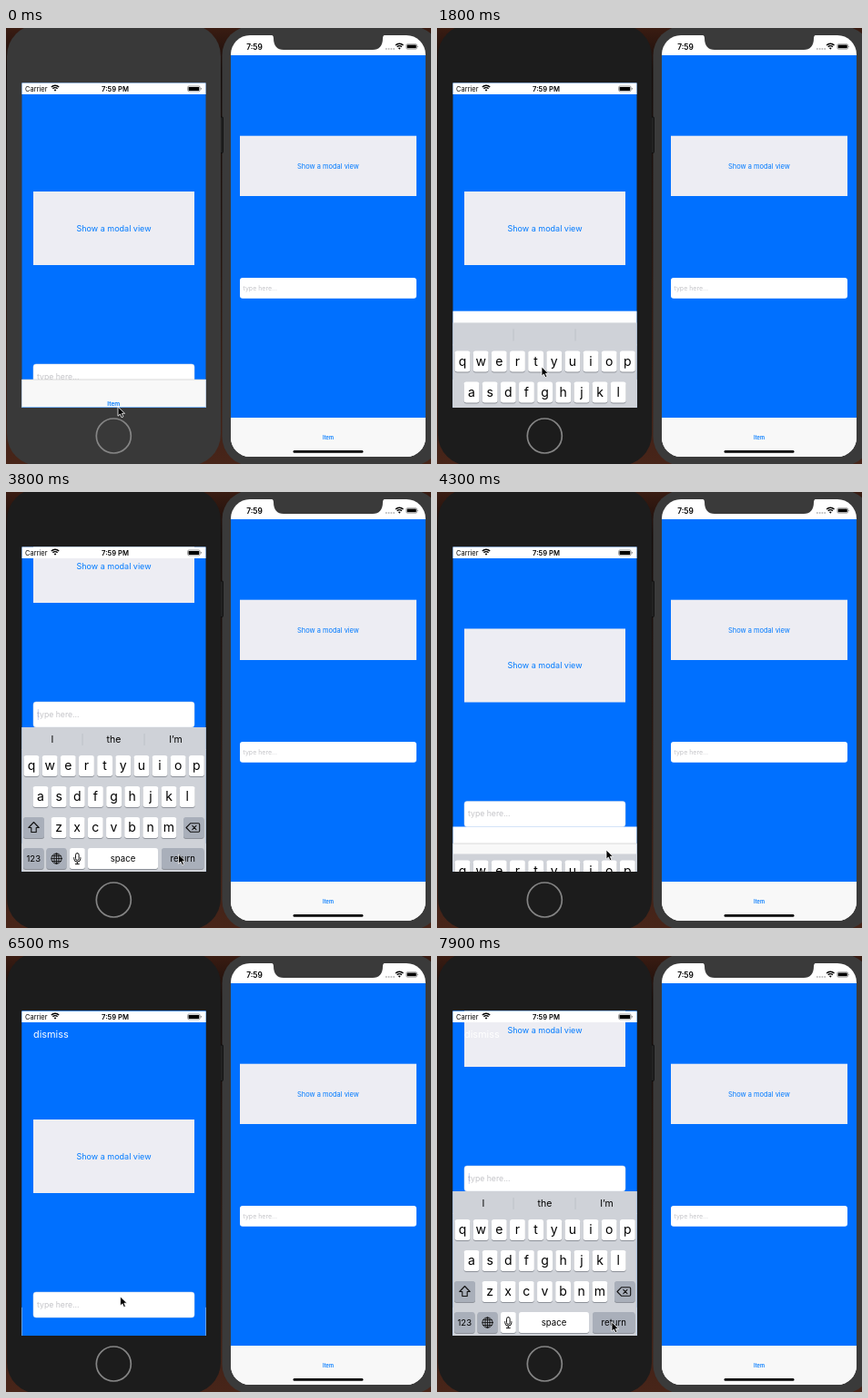
An HTML page for the animation above (8 s loop, 467 by 480 pixels).

```html
<!DOCTYPE html>
<html lang="en">
<head>
<meta charset="utf-8">
<title>Two phones with a keyboard and a modal view</title>
<style>
  html, body { margin: 0; width: 100%; height: 100%; overflow: hidden; background: #1a0f0c; }
  svg { display: block; width: 100vw; height: 100vh; }
  text { font-family: Inter, Roboto, Arial, sans-serif; }
  .mid { text-anchor: middle; }
  .link { fill: #007aff; }
  .hint { fill: #c4c4c8; }
  .sea { fill: #0070ff; }
  .box { fill: #ededf3; }
  .bar { fill: #f8f8f8; }
  .line { fill: none; stroke: #111; stroke-linecap: round; stroke-linejoin: round; }
</style>
</head>
<body>
<svg viewBox="0 0 467 480" preserveAspectRatio="none">
  <defs>
    <linearGradient id="desk" x2="0" y2="1">
      <stop offset="0" stop-color="#3a1c12"/>
      <stop offset=".1" stop-color="#140c0a"/>
      <stop offset=".5" stop-color="#241510"/>
      <stop offset="1" stop-color="#482519"/>
    </linearGradient>
    <clipPath id="screen"><rect x="17.5" y="60.5" width="202" height="357.5"/></clipPath>
    <g id="wifi">
      <path d="M-4.2-4a6 6 0 0 1 8.4 0M-2.6-2.2a3.7 3.7 0 0 1 5.2 0" fill="none" stroke="#000" stroke-width="1.4"/>
      <path d="M-1.4-.9Q0-2 1.4-.9L0 .7z"/>
    </g>
    <g id="battery">
      <rect x=".4" y=".4" width="13.6" height="5.8" rx="1.4" fill="none" stroke="#777" stroke-width=".7"/>
      <rect x="1.3" y="1.3" width="11.8" height="4" rx=".6"/>
      <path d="M14.8 2.2q1.2 1.1 0 2.2z"/>
    </g>
    <g id="form">
      <rect class="box" x="30" y="180" width="177" height="81"/>
      <text class="link mid" x="118.5" y="223.5" font-size="9">Show a modal view</text>
      <rect x="30" y="370" width="177" height="28" rx="3" fill="#fff" stroke="#cfd6e4" stroke-width=".5"/>
      <text class="hint" x="34" y="387" font-size="8.7">type here...</text>
    </g>
  </defs>

  <rect width="467" height="480" fill="url(#desk)"/>

  <!-- right phone -->
  <rect x="237.5" y="-2" width="240" height="484" rx="32" fill="#3a3a3a"/>
  <rect x="247" y="8" width="214" height="464" rx="21" fill="#fff"/>
  <rect class="sea" x="247" y="30" width="214" height="399"/>
  <path class="bar" d="M247 429H461V451a21 21 0 0 1-21 21H268a21 21 0 0 1-21-21z"/>
  <path d="M290 7.5H418c-3 0-4 1.500-4 4c0 8-4 12.500-11 12.500H305c-7 0-11-4.500-11-12.500c0-2.500-1-4-4-4z" fill="#3a3a3a"/>
  <text class="mid" x="273" y="23.500" font-size="8.400" font-weight="600">7:59</text>
  <path d="M417 23h10" stroke="#aaa" stroke-width="1.400" stroke-dasharray="1.600 1.200"/>
  <use href="#wifi" transform="translate(432.300 23)"/>
  <use href="#battery" transform="translate(439.500 17.300) scale(.86 .95)"/>
  <rect class="box" x="257" y="118.700" width="194" height="66.300"/>
  <text class="link mid" x="354" y="154.800" font-size="7.450">Show a modal view</text>
  <rect x="257" y="275" width="194" height="22.700" rx="3" fill="#fff"/>
  <text class="hint" x="260.500" y="289" font-size="7">type here...</text>
  <text class="link mid" x="354" y="452.700" font-size="5.600" font-weight="600">Item</text>
  <rect x="315.500" y="465" width="77" height="2.800" rx="1.400"/>

  <!-- left phone -->
  <rect x="234" y="98" width="4.500" height="39.500" rx="1" fill="#222" stroke="#0c0c0c" stroke-width=".8"/>
  <rect id="body" x="1" y="-4" width="235" height="486" rx="35"/>
  <circle cx="118.300" cy="449" r="19" fill="none" stroke="#858585" stroke-width="1.700"/>

  <g clip-path="url(#screen)">
    <g id="main">
      <rect class="sea" x="17" y="60" width="203" height="358"/>
      <g class="scroll"><use href="#form"/><rect class="caret" x="34.800" y="378" width="1.100" height="12" fill="#4667d8"/></g>
      <rect x="17" y="60" width="203" height="13" fill="#fff"/>
      <rect class="below" x="17" width="203" height="400" fill="#fff"/>
      <rect class="bar" x="17" y="387" width="203" height="31"/>
      <rect x="17" y="386.700" width="203" height=".6" fill="#c2c2c2"/>
      <text class="link mid" x="118.300" y="415.500" font-size="6.600" font-weight="600">Item</text>
    </g>
    <g id="modal">
      <rect class="sea" x="17" y="60" width="203" height="358"/>
      <g class="scroll"><use href="#form"/><rect class="caret" x="34.800" y="378" width="1.100" height="12" fill="#4667d8"/></g>
      <rect x="17" y="61" width="203" height="12" fill="#fff"/>
      <text x="30" y="90" font-size="10.900" fill="#fff">dismiss</text>
      <rect class="below" x="17" width="203" height="400" fill="#fff"/>
    </g>
    <text x="21" y="69.500" font-size="7.500">Carrier</text>
    <use href="#wifi" transform="translate(54 69)"/>
    <text class="mid" x="120" y="69.700" font-size="7.600" font-weight="600">7:59 PM</text>
    <use href="#battery" transform="translate(199.200 63.600)"/>

    <g id="keyboard">
      <g id="strip">
        <rect x="17" y="259" width="203" height="25" fill="#cfd2d8"/>
        <path d="M84 266v13M152 266v13" stroke="#b9bdc5" stroke-width=".8"/>
        <g id="words" class="mid" font-size="10.500">
          <text x="51" y="276">I</text><text x="118.500" y="276">the</text><text x="186.500" y="276">I’m</text>
        </g>
      </g>
      <rect x="17" y="283" width="203" height="140" fill="#cfd2d8"/>
      <g id="keys"></g>
      <path class="line" stroke-width="1.100" d="M30.500 363.500l-5.700 6h3v5h5.400v-5h3z"/>
      <path class="line" stroke-width="1.100" d="M198 369.500l4.500-4.700h9q1.200 0 1.200 1.200v7q0 1.200-1.200 1.200h-9zM204.800 367.400l4.200 4.200m0-4.200l-4.200 4.200"/>
      <g class="line" stroke-width=".9" transform="translate(55.500 403.600)">
        <circle r="5.600"/><ellipse rx="2.600" ry="5.600"/>
        <path d="M0-5.600V5.600M-5.600 0H5.600M-4.700-2.900H4.700M-4.700 2.900H4.700"/>
      </g>
      <g class="line" stroke-width="1" transform="translate(78.300 403.600)">
        <rect x="-1.800" y="-6" width="3.600" height="7.800" rx="1.800"/>
        <path d="M-3.600-1v1a3.600 3.600 0 0 0 7.200 0v-1M0 3.700V6M-2 6H2"/>
      </g>
    </g>
  </g>

  <path id="pointer" d="M0 0V10.200L2.400 8L4 11.700L5.900 10.900L4.300 7.300H7.500z" stroke="#fff" stroke-width=".8"/>
</svg>

<script>
const LOOP = 8000, STEP = 100;
const $ = id => document.getElementById(id);
const shift = (el, y) => el.setAttribute('transform', `translate(0 ${y.toFixed(2)})`);
const ease = p => (p = Math.min(1, Math.max(0, p)), p * p * (3 - 2 * p));

// Critically damped spring from 0 to 1, released at `start`
const spring = (t, start) => {
  const x = Math.max(0, t - start) * .018;
  return 1 - (1 + x) * Math.exp(-x);
};

const OPEN = 1690, CLOSE = 4110, PRESENT = 5130, REOPEN = 6510;
const path = [
  [0, 123, 417], [700, 123, 417], [1400, 115, 375], [1800, 115, 373],
  [2100, 115, 373], [2600, 121, 288], [3000, 121, 288], [3900, 192, 403],
  [4150, 192, 403], [4300, 186, 394], [5000, 114, 211], [5400, 114, 211],
  [6300, 125, 378], [6900, 127, 366], [7200, 127, 366], [7900, 192, 403]
];

function key(x, y, w, label, size = 14, fill = '#fff') {
  return `<rect x="${x}" y="${y + 1}" width="${w}" height="23" rx="2.700" fill="#8d9199"/>
    <rect x="${x}" y="${y}" width="${w}" height="23" rx="2.700" fill="${fill}"/>
    <text class="mid" x="${x + w / 2}" y="${y + 11.5 + size * .34}" font-size="${size}">${label}</text>`;
}

function buildKeys() {
  const grey = '#a9afba';
  const rows = [['qwertyuiop', 28, 290], ['asdfghjkl', 38, 324], ['zxcvbnm', 58, 358]];
  let out = '';
  for (const [letters, x, y] of rows)
    [...letters].forEach((c, i) => out += key(x - 8.4 + i * 20.15, y, 16.8, c));
  out += key(19, 358, 23, '', 9.5, grey) + key(195, 358, 22.5, '', 9.5, grey);
  out += key(19, 392, 22.5, '123', 9.5, grey) + key(44.5, 392, 22, '', 9.5, grey);
  out += key(70, 392, 16.8, '') + key(90, 392, 77, 'space', 9.6) + key(171, 392, 46.5, 'return', 9.6, grey);
  $('keys').innerHTML = out;
}

function setPage(id, scroll, bottom, caret) {
  const page = $(id);
  shift(page.querySelector('.scroll'), scroll);
  page.querySelector('.below').setAttribute('y', bottom);
  page.querySelector('.caret').setAttribute('opacity', caret);
}

function caretAt(age) {
  if (age < 0) return 0;
  const phase = age % 1100;
  return phase > 330 && phase < 800 ? 1 : .25;
}

function pointerAt(t) {
  const i = path.findIndex(p => p[0] > t);
  if (i < 0) return path[path.length - 1].slice(1);
  const [a, b] = [path[i - 1], path[i]];
  const p = ease((t - a[0]) / (b[0] - a[0]));
  return [a[1] + (b[1] - a[1]) * p, a[2] + (b[2] - a[2]) * p];
}

function draw(t) {
  const up = spring(t, OPEN), down = spring(t, CLOSE), again = spring(t, REOPEN);
  const closing = t >= CLOSE, second = t >= REOPEN;

  $('body').setAttribute('fill', t < 1500 ? '#393939' : '#1c1c1c');
  setPage('main',
    closing ? -139 + 128 * down : -139 * ease((t - OPEN - 120) / 250),
    closing ? 259 + 128 * down : 387 - 128 * up,
    closing ? 0 : caretAt(t - OPEN));
  setPage('modal', -139 * ease((t - REOPEN - 120) / 250), 418 - 159 * again, caretAt(t - REOPEN));
  shift($('modal'), 357.5 * (1 - spring(t, PRESENT)));

  // The suggestion strip is dropped as soon as the keyboard closes
  shift($('keyboard'), second ? 159 * (1 - again) : closing ? 135 * down : 159 * (1 - up));
  $('strip').setAttribute('visibility', closing && !second ? 'hidden' : 'inherit');
  $('words').setAttribute('opacity', t - (second ? REOPEN : OPEN) > 250 ? 1 : 0);

  $('pointer').setAttribute('transform', `translate(${pointerAt(t).join(' ')})`);
}

function tick() {
  const t = performance.now() % LOOP;
  draw(Math.floor(t / STEP) * STEP);
  requestAnimationFrame(tick);
}

buildKeys();
tick();
</script>
</body>
</html>
```
